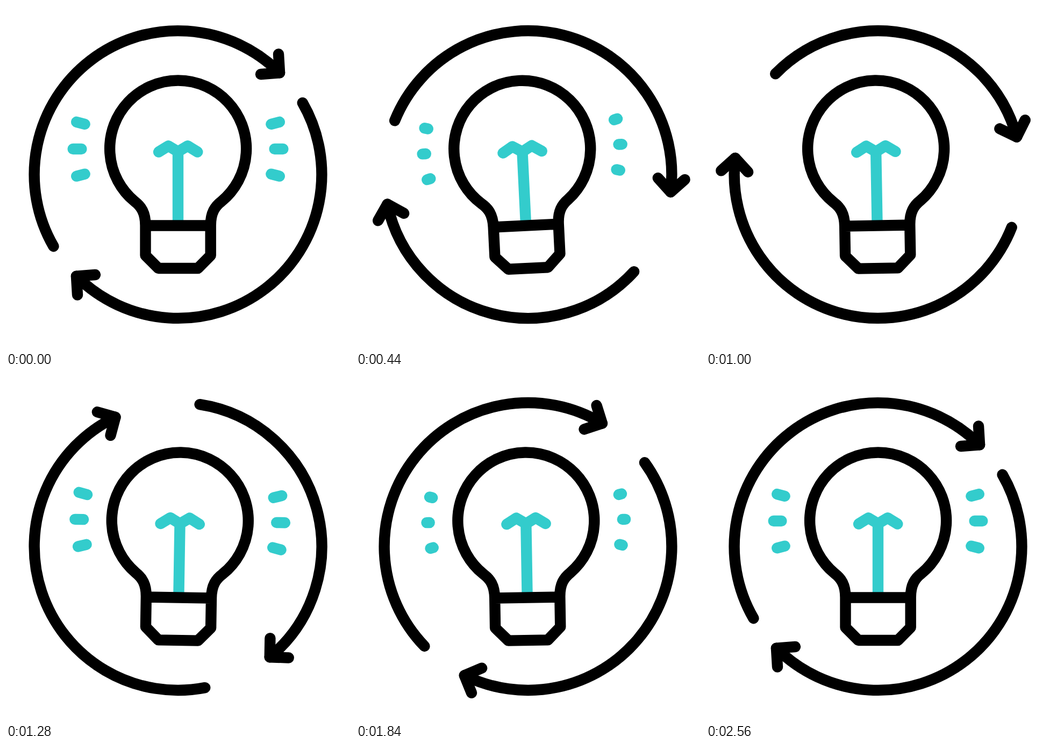
Write an HTML page that moves like this. It is 640 px wide and 640 px high and loops after 2.6 s.

```html
<!DOCTYPE html>
<html lang="en">
<head>
<meta charset="utf-8">
<title>Idea cycle</title>
<style>
html, body { margin: 0; width: 100%; height: 100%; overflow: hidden; background: #fff; }
svg { display: block; width: 100%; height: 100%; }
g, path { fill: none; stroke-width: 20.4; stroke-linecap: round; stroke-linejoin: round; }
.ink { stroke: #000; }
.glow { stroke: #33cccc; }
</style>
</head>
<body>
<svg viewBox="0 0 640 640">
  <g class="ink">
    <path id="arcA"/><path id="tipA"/>
    <path id="arcB"/><path id="tipB"/>
  </g>
  <g id="bulb">
    <g class="glow">
      <path d="M320 400V271" stroke-linecap="butt"/>
      <path d="M284 271.5L302 260.3L320 271L338 260.3L356.3 271.5"/>
      <path id="rays"/>
    </g>
    <g class="ink">
      <path d="M259.5 408.5C259.5 384 251 372.5 239.3 363.5A127 127 0 1 1 400.9 363.5C389.2 372.5 380.7 384 380.7 408.5V464L357 488H283.5L259.5 464ZH380.7"/>
    </g>
  </g>
</svg>
<script>
const LOOP = 2600, CX = 320, CY = 313.5, R = 267.4, SPIN = 2400;
const $ = id => document.getElementById(id);
const clamp = v => Math.min(1, Math.max(0, v));
const smooth = v => { v = clamp(v); return v * v * (3 - 2 * v); };

// Eased turn: cubic-bezier(.33, 0, .25, 1), solved by bisection
function turn(t) {
  const x = clamp(t / SPIN);
  let lo = 0, hi = 1;
  for (let i = 0; i < 30; i++) {
    const s = (lo + hi) / 2, q = 1 - s;
    if (.99 * s * q * q + .756 * s * s * q + s * s * s < x) lo = s; else hi = s;
  }
  return 360 * smooth(lo);
}

// Smooth curve through [time, value] points
function curve(pts, t) {
  const n = pts.length - 1;
  if (t >= pts[n][0]) return pts[n][1];
  let i = 0;
  while (t >= pts[i + 1][0]) i++;
  const slope = k => {
    if (k === 0) return .085;
    if (k === n) return 0;
    return (pts[k + 1][1] - pts[k - 1][1]) / (pts[k + 1][0] - pts[k - 1][0]);
  };
  const [t0, v0] = pts[i], [t1, v1] = pts[i + 1];
  const h = t1 - t0, u = (t - t0) / h, w = 1 - u;
  return v0 * w * w * (1 + 2 * u) + v1 * u * u * (3 - 2 * u)
    + h * u * w * (slope(i) * w - slope(i + 1) * u);
}

const tailLead = [[0, 0], [200, 14.25], [680, 23.8], [1000, 22.9], [1560, 15.15], [1840, 8.2], [2360, 0]];
const sway = [0, -4.1, 6, -2, 3, -1, 0];
const SWAY_STEP = 360;
const flashes = [0, 580, 1290, 1990, 2600];
const FADE = 243;
// Left-hand rays: outer x, y, inner x, y
const rays = [[131.2, 215.8, 146.6, 219.8], [124.6, 266, 140.4, 266], [131.2, 316.6, 146.6, 312.6]];

function point(deg) {
  const a = deg * Math.PI / 180;
  return (CX + R * Math.cos(a)).toFixed(2) + ' ' + (CY + R * Math.sin(a)).toFixed(2);
}

function arrow(id, tail, head) {
  const big = head - tail > 180 ? 1 : 0;
  $('arc' + id).setAttribute('d', `M${point(tail)}A${R} ${R} 0 ${big} 1 ${point(head)}`);
  $('tip' + id).setAttribute('transform', `rotate(${head + 45} ${CX} ${CY})`);
}

function swayAt(t) {
  const k = Math.floor(t / SWAY_STEP);
  if (k >= sway.length - 1) return 0;
  return sway[k] + (sway[k + 1] - sway[k]) * smooth(t / SWAY_STEP - k);
}

// Rays grow from their inner end, then shrink toward the outer end
function rayPath(t) {
  const peak = flashes.find(f => Math.abs(t - f) < FADE);
  if (peak === undefined) return '';
  const p = smooth(Math.abs(t - peak) / FADE);
  const from = t < peak ? p : 0, to = t < peak ? 1 : 1 - p;
  return rays.map(([ox, oy, ix, iy]) => {
    const at = k => [ox + (ix - ox) * k, oy + (iy - oy) * k];
    const [x0, y0] = at(from), [x1, y1] = at(to);
    return `M${x0} ${y0}L${x1} ${y1}M${640 - x0} ${y0}L${640 - x1} ${y1}`;
  }).join('');
}

function draw(t) {
  const lead = turn(t), lag = turn(t - 80);
  arrow('A', 150 + lead, 315 + lead);
  arrow('B', -30 + lead + curve(tailLead, t), 135 + lag);
  $('bulb').setAttribute('transform', `rotate(${swayAt(t)} 320 488)`);
  $('rays').setAttribute('d', rayPath(t));
}

for (const id of 'AB') $('tip' + id).setAttribute('d', 'M507 89.4L509.1 124.4L474 127');

const start = performance.now();
function tick() {
  draw((performance.now() - start) % LOOP);
  requestAnimationFrame(tick);
}
draw(0);
requestAnimationFrame(tick);
</script>
</body>
</html>
```
